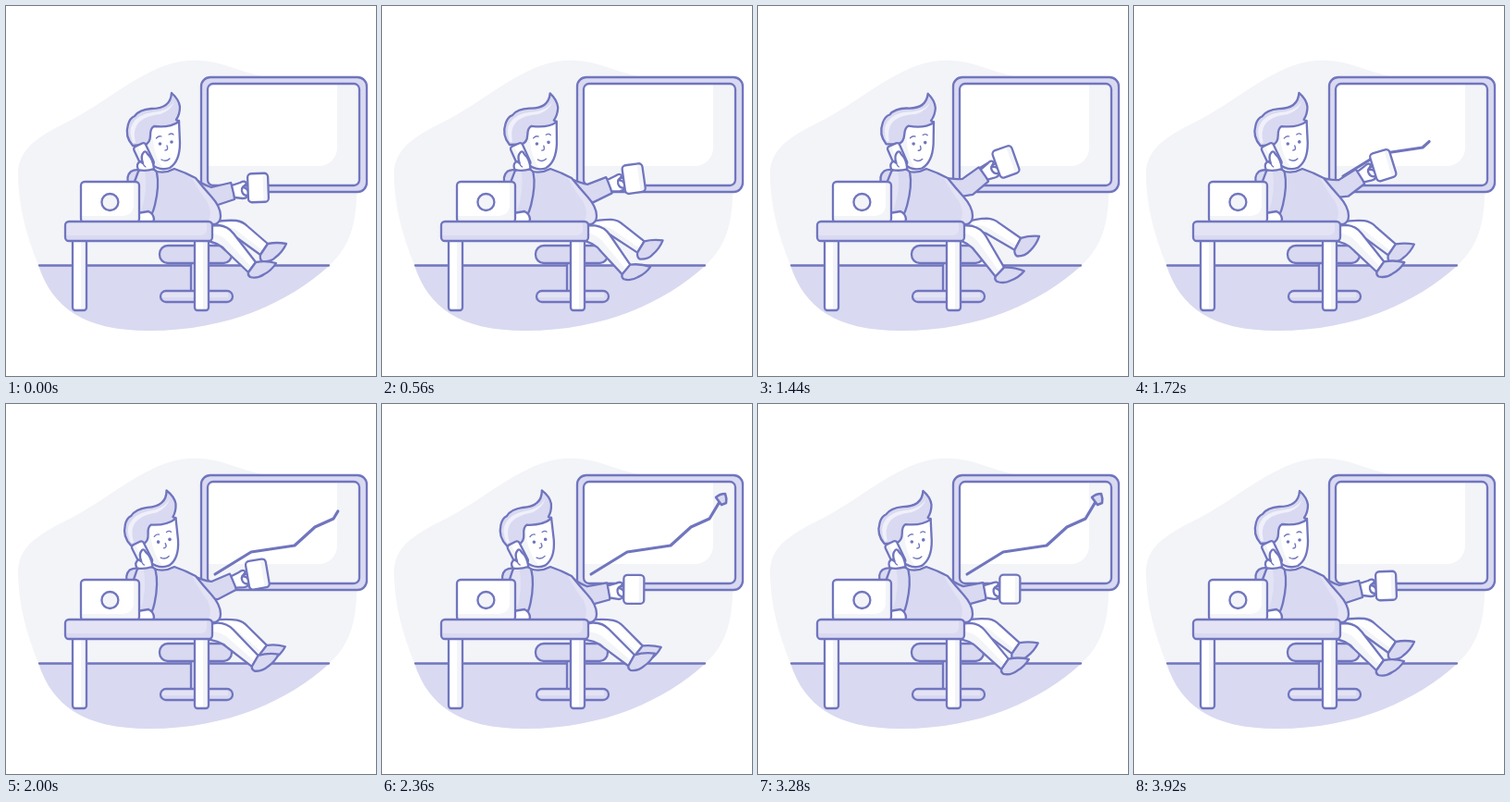
Write an HTML page with a canvas that moves like this. It is 400 by 400 pixels and loops after 4000 ms.

```html
<!DOCTYPE html>
<html lang="en">
<head>
<meta charset="utf-8">
<title>Desk call</title>
<style>
html, body { margin: 0; width: 100%; height: 100%; overflow: hidden; background: #fff; }
canvas { display: block; width: 400px; height: 400px; }
</style>
</head>
<body>
<canvas id="stage" width="400" height="400"></canvas>
<script>
const ctx = document.getElementById('stage').getContext('2d');
const INK = '#7075be', LILAC = '#d9d9f1', LIGHT = '#e3e3f5', PALE = '#f3f4f8', WHITE = '#fff';
const LOOP = 4000;

// Keyframe tracks: [time, value], eased between neighbours
const HEAD = [[320, 0], [840, 4.2], [1240, 4.2], [2140, -4.2], [2640, -4.2], [3440, 0]];
const SWING = [[320, 0], [920, 1], [1240, 1], [2140, -1], [2640, -1], [3600, 0]];
const ARM = [[320, 0], [920, -22], [1480, -22], [2600, 6], [3900, 0]];
const CHART = [[226, 184], [265, 160], [312, 153], [334, 133], [354, 124], [366, 104]];

const clamp = v => Math.max(0, Math.min(1, v));
const ease = u => (1 - Math.cos(Math.PI * clamp(u))) / 2;

function track(keys, t) {
  for (let i = 1; i < keys.length; i++) {
    const [t0, a] = keys[i - 1], [t1, b] = keys[i];
    if (t < t1) return a + (b - a) * ease((t - t0) / (t1 - t0));
  }
  return keys[keys.length - 1][1];
}

const path = d => new Path2D(d);
function box(x, y, x2, y2, r) {
  const p = new Path2D();
  p.roundRect(x, y, x2 - x, y2 - y, r);
  return p;
}

// Filled, optionally shaded, then outlined
function draw(p, fill, shade, tone = PALE, line = 2.3) {
  if (fill) { ctx.fillStyle = fill; ctx.fill(p); }
  if (shade) {
    ctx.save();
    ctx.clip(p);
    ctx.fillStyle = tone;
    ctx.fill(shade);
    ctx.restore();
  }
  if (line) { ctx.strokeStyle = INK; ctx.lineWidth = line; ctx.stroke(p); }
}

function turned(x, y, deg, paint) {
  ctx.save();
  ctx.translate(x, y);
  ctx.rotate(deg * Math.PI / 180);
  ctx.translate(-x, -y);
  paint();
  ctx.restore();
}

const blob = path('M13 180C14 153 37 140 67 125C109 104 148 67 188 60C226 54 246 70 282 77C336 86 379 140 379 202C379 246 365 266 349 281C306 320 240 351 155 351C84 351 50 326 35 280C22 248 13 216 13 180Z');
const upperLeg = path('M222 234Q238 231 249 232Q256 233 261 238L283 257L275 269L246 248Q238 243 222 246Z');
const upperShade = path('M238 238Q248 240 256 248L280 266L270 274L230 250Z');
const upperShoe = path('M283 257Q293 255 303 257Q299 266 291 272Q286 277 277 276Q274 274 275 269Z');
const lowerLeg = path('M212 238L230 237Q240 238 246 246L270 277L262 288L238 265Q230 255 212 253Z');
const lowerShade = path('M220 245Q234 247 241 256L266 283L258 292L210 258Z');
const lowerShoe = path('M270 277Q281 275 292 278Q287 286 279 290Q272 295 264 293Q261 291 262 288Z');
const torso = path('M160 178Q171 182 182 176Q194 180 205 186Q213 196 222 206Q232 217 232 227Q232 234 226 236L150 236L150 190Z');
const torsoShade = path('M198 180L240 205L238 240L214 240Q226 226 217 211Q207 198 198 180Z');
const face = path('M150 128L187 124L188 148Q188 168 177 175Q166 179 156 170L145 152Z');
const hair = path('M137 151Q128 141 132 128Q134 121 139 119Q144 112 157 111Q178 111 179 94Q187 101 188 109Q188 117 184 123L187 125Q177 132 160 130Q156 132 156 140Q156 148 150 150Z');
const hairLight = path('M137 148Q132 134 137 127Q143 117 158 115Q178 113 182 102Q180 112 167 117Q148 119 142 128Q137 135 140 148Z');
const sleeve = path('M143 179Q146 175 154 176Q162 176 163 180Q166 194 161 215Q158 228 151 234L132 234L137 195Z');
const sleeveShade = path('M143 178L150 178Q154 200 145 224L138 224Z');

function board() {
  draw(box(211, 77, 390, 201, 10), LILAC);
  draw(box(218, 84, 382, 194, 6), PALE, box(218, 84, 358, 173, [0, 0, 20, 0]), WHITE);
}

function chart(t) {
  const grow = Math.sin(clamp((t - 1355) / 870) * Math.PI / 2);
  if (!grow) return;
  ctx.save();
  ctx.globalAlpha = 1 - ease((t - 3520) / 320);
  let left = 168 * grow;
  ctx.beginPath();
  ctx.moveTo(...CHART[0]);
  for (let i = 1; i < CHART.length && left > 0; i++) {
    const [x, y] = CHART[i - 1], dx = CHART[i][0] - x, dy = CHART[i][1] - y;
    const len = Math.hypot(dx, dy), u = Math.min(1, left / len);
    ctx.lineTo(x + dx * u, y + dy * u);
    left -= len;
  }
  ctx.strokeStyle = INK;
  ctx.lineWidth = 3.2;
  ctx.stroke();
  const size = ease((t - 2040) / 200);
  if (size) {
    ctx.translate(367, 103);
    ctx.scale(size, size);
    draw(path('M-6 -2Q-2 -6 4 -6Q6 -1 5 4L0 6Z'), LILAC, null, PALE, 2.6);
  }
  ctx.restore();
}

function chair() {
  draw(box(200, 270, 205, 312, 0), LILAC);
  draw(box(167, 308, 245, 320, 6), LILAC, box(167, 308, 240, 315, 0), LIGHT);
  draw(box(166, 259, 244, 278, 9), LILAC);
}

function legs(k) {
  turned(225, 243, k > 0 ? -7.7 * k : -4.4 * k, () => {
    draw(upperLeg, WHITE, upperShade);
    draw(upperShoe, LILAC);
  });
  turned(225, 250, k > 0 ? 9.8 * k : 7 * k, () => {
    draw(lowerLeg, WHITE, lowerShade);
    draw(lowerShoe, LILAC);
  });
}

function mugArm(angle) {
  turned(198, 194, angle, () => {
    draw(path('M198 183Q212 193 222 196L243 191Q247 200 247 209L226 216L200 210Z'), LILAC);
    draw(path('M244 194L253 191Q259 188 260 192L256 196Q262 197 262 202Q262 208 256 208L247 207Z'), WHITE);
    draw(path('M261 194Q254 194 255 200Q256 205 261 205'), null);
    turned(272.5, 196, -2 - angle * 0.2, () => {
      draw(box(261.5, 181, 283.5, 212, 4), WHITE, box(278, 181, 284, 212, 0));
    });
  });
}

function dot(x, y) {
  ctx.beginPath();
  ctx.arc(x, y, 1.8, 0, 7);
  ctx.fillStyle = INK;
  ctx.fill();
}

function head(angle) {
  turned(168, 178, angle, () => {
    draw(face, WHITE, path('M150 130L158 130Q158 164 172 177L155 177Z'));
    draw(hair, LILAC, hairLight, '#f0f0fa');
    dot(166.5, 149);
    dot(179, 147);
    draw(path('M162.5 143Q165 140 168 141M176 139Q179 137 181 139'), null, null, PALE, 1.3);
    draw(path('M174 151Q176 156 172 156M168 166Q173 169 177 165'), null, null, PALE, 1.4);
  });
}

function phoneArm(k) {
  turned(152, 225, 2 * k, () => {
    draw(path('M133 195Q129 184 135 179Q140 176 146 178L150 196Z'), LILAC);
    draw(sleeve, LILAC, sleeveShade, LIGHT);
    turned(149, 162, -25, () => draw(box(142, 149, 156, 175, 3), WHITE, box(142, 149, 147, 175, 0)));
    draw(path('M143 177Q140 171 145 168L148 170Q145 162 149 158Q151 156 153 160Q159 165 160 176Q151 179 143 177Z'), WHITE);
    draw(path('M148 170Q149 173 151 174'), null, null, PALE, 1.3);
  });
  draw(path('M142 224L154 222Q160 225 160 231L158 235L142 235Z'), WHITE);
}

function desk() {
  for (const x of [72, 204]) {
    draw(box(x, 246, x + 15, 329, 3), WHITE, box(x + 9, 246, x + 15, 329, 0));
  }
  draw(box(81, 190, 144, 234, 4), WHITE, path('M81 227L126 227Q138 226 138 214L138 190L145 190L145 235L81 235Z'));
  draw(path('M121.4 212A9 9 0 1 1 103.4 212A9 9 0 1 1 121.4 212Z'), PALE);
  draw(box(64, 233, 223, 254, 4), LILAC, box(64, 233, 217, 248, [0, 0, 6, 0]), LIGHT);
}

function render(t) {
  ctx.fillStyle = WHITE;
  ctx.fillRect(0, 0, 400, 400);
  ctx.lineJoin = ctx.lineCap = 'round';
  draw(blob, PALE, box(0, 280, 400, 400, 0), LILAC, 0);
  draw(path('M36 280.5H349'), null);
  board();
  chart(t);
  const swing = track(SWING, t);
  chair();
  legs(swing);
  mugArm(track(ARM, t));
  draw(torso, LILAC, torsoShade, LIGHT);
  head(track(HEAD, t));
  phoneArm(swing);
  desk();
}

const start = performance.now();
function tick() {
  const t = (performance.now() - start) % LOOP;
  render(Math.floor(t / 40) * 40);
  requestAnimationFrame(tick);
}
tick();
</script>
</body>
</html>
```
